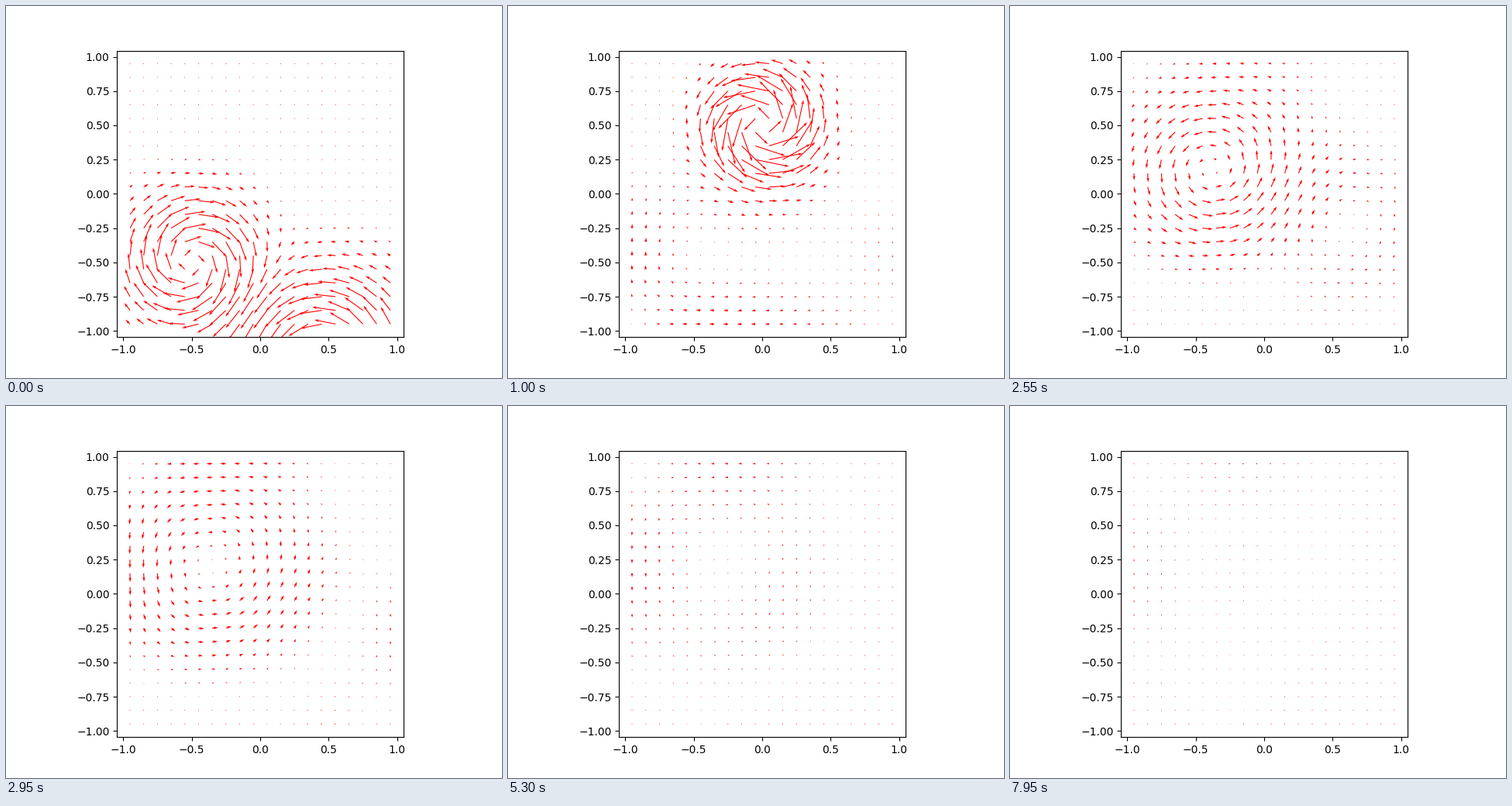
Write a matplotlib script that moves like this. It is 640 by 480 pixels and loops after 8000 ms.

```python
import numpy as np
import matplotlib.pyplot as plt
from matplotlib.animation import FuncAnimation

FRAMES, INTERVAL = 160, 50

axis = np.linspace(-0.95, 0.95, 20)
X, Y = np.meshgrid(axis, axis)


def spread(age):
    """Variance gained by diffusion after `age` frames."""
    return 0.0026 * age + 0.075 * (1 - np.exp(-age / 10))


def profile(x, c, var, walls):
    """Gaussian and its slope, with odd mirror images when walls act."""
    images = [(1, c)]
    if walls:
        images = [(s, p + 4 * n) for n in (-1, 0, 1)
                  for s, p in ((1, c), (-1, 2 - c))]
    value, slope = 0, 0
    for sign, pos in images:
        d = x - pos
        g = sign * np.exp(-d * d / (2 * var))
        value = value + g
        slope = slope - d / var * g
    return value, slope


def swirl(age, cx, cy, spin, var0, keep):
    """Diffusing vortex; positive spin turns counter-clockwise."""
    if age < 0:
        return np.zeros((2, *X.shape))
    var = var0 + spread(age)
    px, sx = profile(X, cx, var, age > 0)
    py, sy = profile(Y, cy, var, age > 0)
    fade = keep + (1 - keep) * np.exp(-age / 15)
    peak = spin * var0 ** 2 / var * fade
    return peak * np.array([px * sy, -sx * py])


def velocity(frame):
    stir, push = frame - 20, frame - 51
    return (swirl(frame, -0.5, -0.5, -170, 0.078, 0.25)
            + swirl(frame, 0.5, -1.2, 142, 0.125, 0)
            + swirl(stir, 0, 0.5, 320, 0.05, 0.2)
            + swirl(push, -0.4, 0.15, 60, 0.12, 1)
            + swirl(push, 0.6, -0.2, -18, 0.12, 1))


fig, ax = plt.subplots(figsize=(6.4, 4.8), dpi=100)
ax.set_aspect("equal")
arrows = ax.quiver(X, Y, *velocity(0), color="red",
                   scale=1, scale_units="dots")


def update(frame):
    arrows.set_UVC(*velocity(frame))
    return (arrows,)


anim = FuncAnimation(fig, update, frames=FRAMES, interval=INTERVAL,
                     repeat=True, repeat_delay=0)
plt.show()
```
